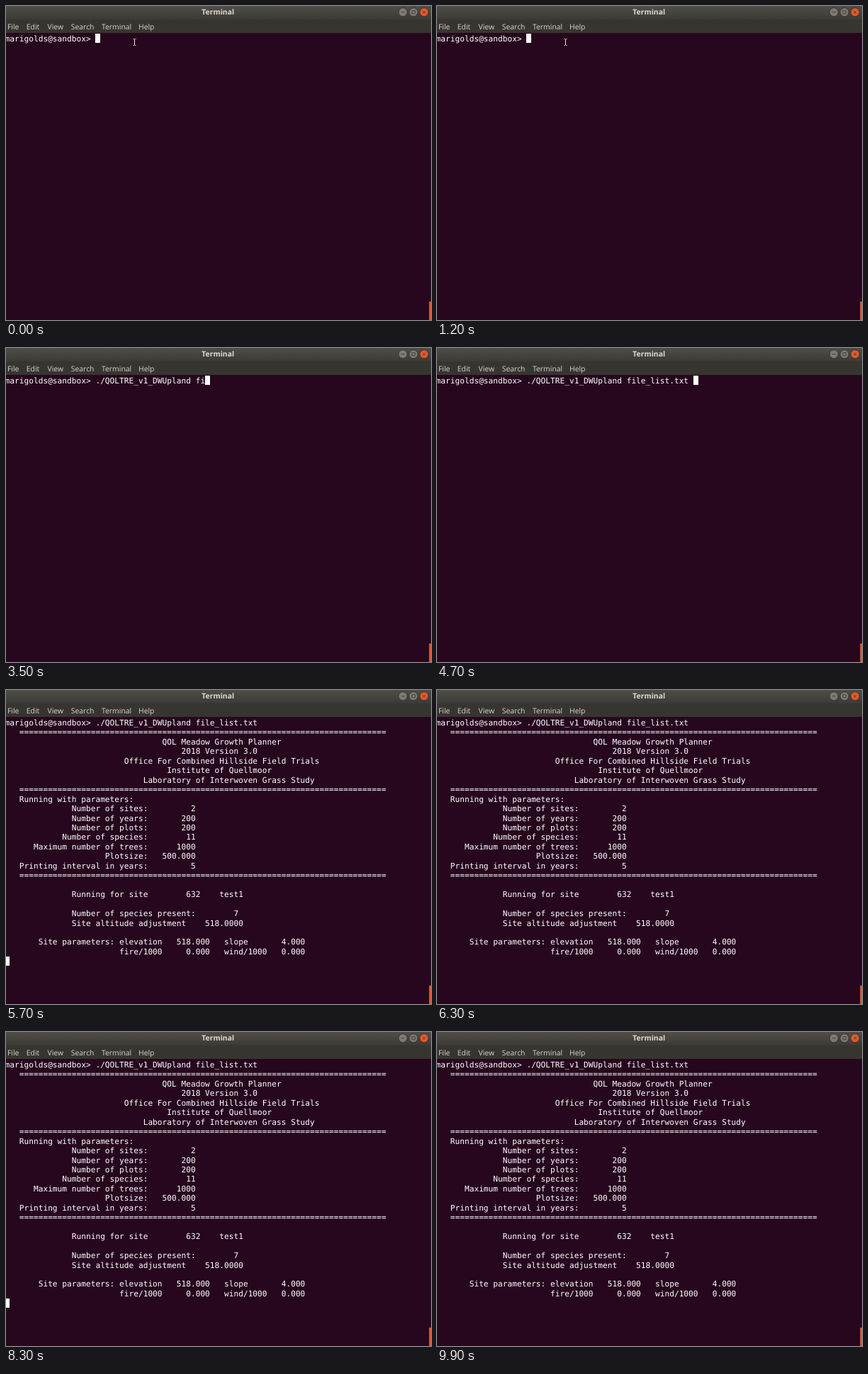
An HTML page that plays this animation: 600 by 443 pixels, repeating every 10 s.

```html
<!DOCTYPE html>
<html lang="en">
<head>
<meta charset="utf-8">
<title>Terminal</title>
<style>
  html, body { margin: 0; width: 100%; height: 100%; overflow: hidden; background: #26071e; }
  #stage { position: relative; width: 600px; height: 443px; overflow: hidden; }
  svg { position: absolute; left: 0; top: 0; font: 10.4px "Open Sans", sans-serif; text-rendering: geometricPrecision; }
  pre {
    position: absolute; left: -1.4px; top: 40px; margin: 0;
    font: 11.18px/13.46px "DejaVu Sans Mono", monospace;
    color: #fff; text-rendering: geometricPrecision;
  }
  #cursor { position: absolute; width: 6.73px; height: 13.46px; background: #fff; }
</style>
</head>
<body>
<div id="stage">
  <svg width="600" height="443">
    <defs>
      <linearGradient id="bar" x2="0" y2="1">
        <stop stop-color="#504e47"/><stop offset="1" stop-color="#3b3a35"/>
      </linearGradient>
    </defs>
    <rect width="600" height="19" fill="url(#bar)"/>
    <rect y="19" width="600" height="19" fill="#373530"/>
    <text x="299.2" y="12.4" font-weight="700" text-anchor="middle" fill="#dfdbd2">Terminal</text>
    <g fill="#dad6cd">
      <text x="2" y="33">File</text>
      <text x="28.8" y="33">Edit</text>
      <text x="58.5" y="33">View</text>
      <text x="91.8" y="33">Search</text>
      <text x="135" y="33">Terminal</text>
      <text x="187" y="33">Help</text>
    </g>
    <g transform="translate(0 -.3)" fill="#7d7b74" stroke="#33312d" stroke-width=".8">
      <circle cx="560.3" cy="9" r="6"/>
      <circle cx="575.2" cy="9" r="6"/>
      <circle cx="590.2" cy="9" r="6" fill="#e5592b"/>
      <path d="M557.8 9h5M573 6.9h4.4v4.2H573zM588.3 7.1l3.8 3.8m0-3.8l-3.8 3.8" fill="none"/>
    </g>
    <rect x="597.3" y="417" width="2.7" height="26" fill="#d95c35"/>
    <path id="pointer" d="M179.5 46.5h1.2l.8.8.8-.8h1.2M181.5 47v8M179.5 55.5h1.2l.8-.8.8.8h1.2" fill="none" stroke="#e9e5e8"/>
  </svg>
  <pre id="screen"></pre>
  <div id="cursor"></div>
</div>
<script>
const LOOP = 10000, ENTER = 5500, BLINK = 600, COL = 6.73, ROW = 13.46;
const PROMPT = 'marigolds@sandbox> ';
const COMMAND = './QOLTRE_v1_DWUpland file_list.txt ';

// [time, characters visible]; the long jumps are tab completions
const KEYS = [[0, 0], [1300, 1], [1500, 2], [1900, 3], [2100, 4], [2700, 21],
              [3300, 22], [3500, 23], [3700, 24], [4200, 35], [ENTER, 35]];

// Builds a line from column/text pairs
const line = (...parts) => {
  let s = '';
  for (let i = 0; i < parts.length; i += 2) s = s.padEnd(parts[i]) + parts[i + 1];
  return s;
};
const param = (label, value) => label.padStart(30) + value.padStart(10);
const rule = line(3, '='.repeat(77));

const OUTPUT = [
  rule,
  line(33, 'QOL Meadow Growth Planner'),
  line(37, '2018 Version 3.0'),
  line(25, 'Office For Combined Hillside Field Trials'),
  line(34, 'Institute of Quellmoor'),
  line(29, 'Laboratory of Interwoven Grass Study'),
  rule,
  line(3, 'Running with parameters:'),
  param('Number of sites:', '2'),
  param('Number of years:', '200'),
  param('Number of plots:', '200'),
  param('Number of species:', '11'),
  param('Maximum number of trees:', '1000'),
  param('Plotsize:', '500.000'),
  param('Printing interval in years:', '5'),
  rule,
  '',
  line(14, 'Running for site', 38, '632', 45, 'test1'),
  '',
  line(14, 'Number of species present:', 48, '7'),
  line(14, 'Site altitude adjustment', 42, '518.0000'),
  '',
  line(7, 'Site parameters:', 24, 'elevation', 36, '518.000', 46, 'slope', 58, '4.000'),
  line(24, 'fire/1000', 38, '0.000', 46, 'wind/1000', 58, '0.000'),
];

const [screenEl, cursorEl, pointerEl] =
  ['screen', 'cursor', 'pointer'].map(id => document.getElementById(id));
let shown = '';

function draw(t) {
  const [keyTime, count] = KEYS.filter(([time]) => time <= t).pop();
  const done = t >= ENTER;
  const prompt = PROMPT + COMMAND.slice(0, count);
  const text = done ? [prompt, ...OUTPUT].join('\n') : prompt;
  if (text !== shown) screenEl.textContent = shown = text;

  const col = done ? 0 : prompt.length, row = done ? OUTPUT.length + 1 : 0;
  cursorEl.style.left = col * COL - 1.4 + 'px';
  cursorEl.style.top = 39 + row * ROW + 'px';
  cursorEl.style.visibility = (t - keyTime) % (2 * BLINK) < BLINK ? 'visible' : 'hidden';
  pointerEl.style.visibility = count ? 'hidden' : 'visible';
}

const start = performance.now();
function tick() {
  draw((performance.now() - start) % LOOP);
  requestAnimationFrame(tick);
}
tick();
</script>
</body>
</html>
```
